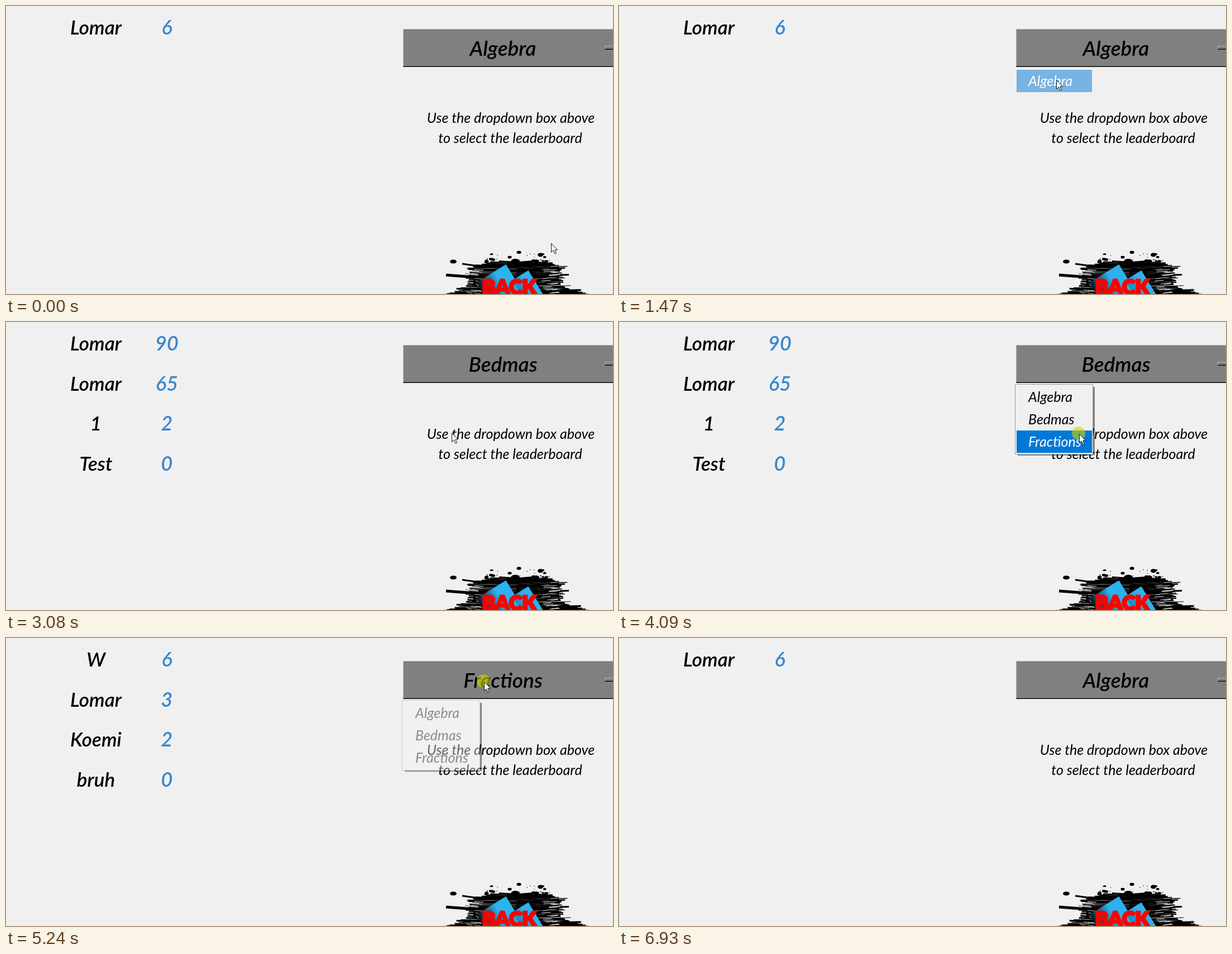
These frames come from a looping animation (1087x515 px, 7.48 s). An HTML page with a canvas:

```html
<!DOCTYPE html>
<html lang="en">
<head>
<meta charset="utf-8">
<title>Leaderboard</title>
<style>
html, body { margin: 0; width: 100%; height: 100%; overflow: hidden; background: #f0f0f0; }
canvas { display: block; }
</style>
</head>
<body>
<canvas id="stage" width="1087" height="515"></canvas>
<script>
const g = document.getElementById('stage').getContext('2d');
const LOOP = 7480, TICK = 77, BG = '#f0f0f0', ROW = 40, GONE = 90;
const topics = ['Algebra', 'Bedmas', 'Fractions'];
const boards = [
  [['Lomar', 6]],
  [['Lomar', 90], ['Lomar', 65], ['1', 2], ['Test', 0]],
  [['W', 6], ['Lomar', 3], ['Koemi', 2], ['bruh', 0]]
];

// Pointer stops: arriving tick, leaving tick, x, y
const stops = [
  [0, 0, 976, 424], [5, 8, 904, -25], [9, 9, 921, 35],
  [12, 13, 858, 82], [17, 20, 783, 132],
  [24, 25, 868, 87], [30, 30, 848, 156], [34, 36, 800, 182], [39, 40, 798, 198],
  [44, 45, 883, 84], [48, 48, 847, 184], [51, 54, 824, 200], [62, 62, 822, 118],
  [66, 69, 856, 78], [76, 79, 786, 134], [83, 86, 781, 178], [89, GONE, 1022, 448]
];
// Each visit to the menu: opening tick, choosing tick, chosen topic
const visits = [[13, 18, 0], [25, 35, 1], [45, 53, 2], [68, 78, 0]];

function pointerAt(tick) {
  const i = stops.findLastIndex(s => s[0] <= tick);
  const [, leave, x, y] = stops[i];
  const [arrive, , nx, ny] = stops[i + 1] || [GONE + 1, 0, x, y];
  const k = Math.max(0, (tick - leave) / (arrive - leave));
  return [Math.round(x + (nx - x) * k), Math.round(y + (ny - y) * k)];
}

function box(x, y, w, h, color) {
  g.fillStyle = color;
  g.fillRect(x, y, w, h);
}

function raised(x, y, w, h) {
  box(x, y, w, h, '#000');
  box(x, y, w, h - 1, '#b3b3b3');
  box(x + 1, y + 1, w, h - 2, '#4d4d4d');
  box(x + 1, y + 1, w, h - 3, '#808080');
}

function text(str, x, y, size, weight, color = '#000', align = 'center') {
  g.font = `italic ${weight} ${size}px Lato, "Open Sans", sans-serif`;
  g.textAlign = align;
  g.fillStyle = color;
  g.fillText(str, x, y);
}

function blob(x, y, rx, ry, color = '#000') {
  g.beginPath();
  g.ellipse(x, y, rx, ry, 0, 0, 7);
  g.fillStyle = color;
  g.fill();
}

function line(x0, y0, x1, y1, width, color = '#000') {
  g.beginPath();
  g.moveTo(x0, y0);
  g.lineTo(x1, y1);
  g.lineWidth = width;
  g.strokeStyle = color;
  g.stroke();
}

function random(seed) {
  return () => (seed = seed * 16807 % 2147483647) / 2147483647;
}

function patch(x, y, w, h, from) {
  g.save();
  g.translate(x, y);
  g.rotate(-0.55);
  const fill = g.createLinearGradient(-w / 2, 0, w / 2, 0);
  fill.addColorStop(0, from);
  fill.addColorStop(0.6, '#2bb3f0');
  box(-w / 2, -h / 2, w, h, fill);
  g.restore();
}

function backButton() {
  const rnd = random(4217);
  // Brush strokes widen quickly at the top and flare again at the bottom
  for (let y = 457; y < 518; y += 1.5) {
    const half = 24 + 50 * Math.min(1, (y - 456) / 10) + 0.11 * Math.max(0, y - 495) ** 2;
    const left = 912 - half - 18 * rnd() ** 2, right = 916 + half + 18 * rnd() ** 2;
    line(left, y - 1, 914, y + 1, 1 + 2 * rnd());
    line(914, y + 1, right, y - 2, 1 + 2 * rnd());
  }
  // Dry scratches near both ends
  for (let i = 0; i < 40; i++) {
    const x = (i % 2 ? 822 : 958) + 22 * rnd(), y = 464 + 50 * rnd();
    line(x, y, x + 8 + 16 * rnd(), y + (i % 2 ? 1.5 : -1.5), 0.4 + 0.8 * rnd(), BG);
  }
  for (let i = 0; i < 34; i++) {
    const size = 0.6 + 2.6 * rnd() ** 3;
    blob(855 + 120 * rnd(), 460 - 20 * rnd() ** 1.6, 1.5 * size, size);
  }
  line(788, 481, 840, 485, 5);
  line(817, 461, 860, 467, 3);
  blob(801, 457, 6, 3.5);
  blob(957, 445, 5, 3.5);
  blob(912, 457, 8, 5);

  patch(884, 503, 62, 58, '#04161f');
  patch(934, 503, 34, 50, '#1c86b8');
  g.font = '900 36px Lato, "Open Sans", sans-serif';
  g.textAlign = 'center';
  g.lineWidth = 3;
  g.strokeStyle = g.fillStyle = '#f00';
  g.strokeText('BACK', 901, 515);
  g.fillText('BACK', 901, 515);
}

function item(i, lit, alpha) {
  g.globalAlpha = alpha;
  if (lit) box(712, 114 + ROW * i, 135, ROW, '#0078d7');
  g.globalAlpha = lit ? 1 : alpha;
  text(topics[i], 733, 143 + ROW * i, 25, 400, lit ? '#fff' : '#000', 'left');
  g.globalAlpha = 1;
}

function menu(hover, alpha) {
  box(849, 116, 3, 122, 'rgba(0,0,0,.45)');
  box(714, 237, 135, 2, 'rgba(0,0,0,.4)');
  g.globalAlpha = alpha;
  box(710, 112, 138, 124, BG);
  g.lineWidth = 1;
  g.strokeStyle = '#999';
  g.strokeRect(709.5, 111.5, 139, 125);
  topics.forEach((_, i) => item(i, i === hover, alpha));
}

function pointer(x, y, pressed) {
  if (pressed) blob(x - 1, y - 1, 12, 12, 'rgba(210,215,0,.6)');
  g.save();
  g.translate(x + 0.5, y + 0.5);
  const arrow = new Path2D('M0 0V16L3.7 12.5L6.5 18.5L9 17.5L6.3 11.5H11Z');
  g.fillStyle = '#fff';
  g.fill(arrow);
  g.lineWidth = 1;
  g.strokeStyle = '#111';
  g.stroke(arrow);
  g.restore();
}

function draw(time) {
  const tick = Math.floor((time % LOOP + 8) / TICK);
  const [x, y] = pointerAt(tick);
  let topic = 0;
  for (const [, chosen, next] of visits) if (tick >= chosen + 2) topic = next;

  box(0, 0, 1087, 515, BG);
  boards[topic].forEach(([name, score], i) => {
    const base = 51 + 71.7 * i;
    text(name, 161, base, 35, 600);
    text(score, 288, base, 36, 600, '#3787cf');
  });
  raised(711, 41, 400, 68);
  text(topics[topic], 890, 89, 37, 600);
  raised(1072, 71, 30, 7);
  text('Use the dropdown box above', 904, 209, 25, 400);
  text('to select the leaderboard', 903, 245, 25, 400);
  backButton();

  const hover = x < 847 ? Math.floor((y - 114) / ROW) : -1;
  let pressed = false;
  for (const [open, chosen, next] of visits) {
    if (tick >= open && tick <= chosen) menu(hover, tick === open ? 0.42 : 1);
    const fade = tick - chosen;
    if (fade === 1 || fade === 2) item(next, true, 0.5 / fade);
    pressed ||= tick === open || tick === chosen;
  }
  if (tick < GONE) pointer(x, y, pressed);
}

const start = performance.now();
function loop() {
  draw(performance.now() - start);
  requestAnimationFrame(loop);
}
loop();
</script>
</body>
</html>
```
